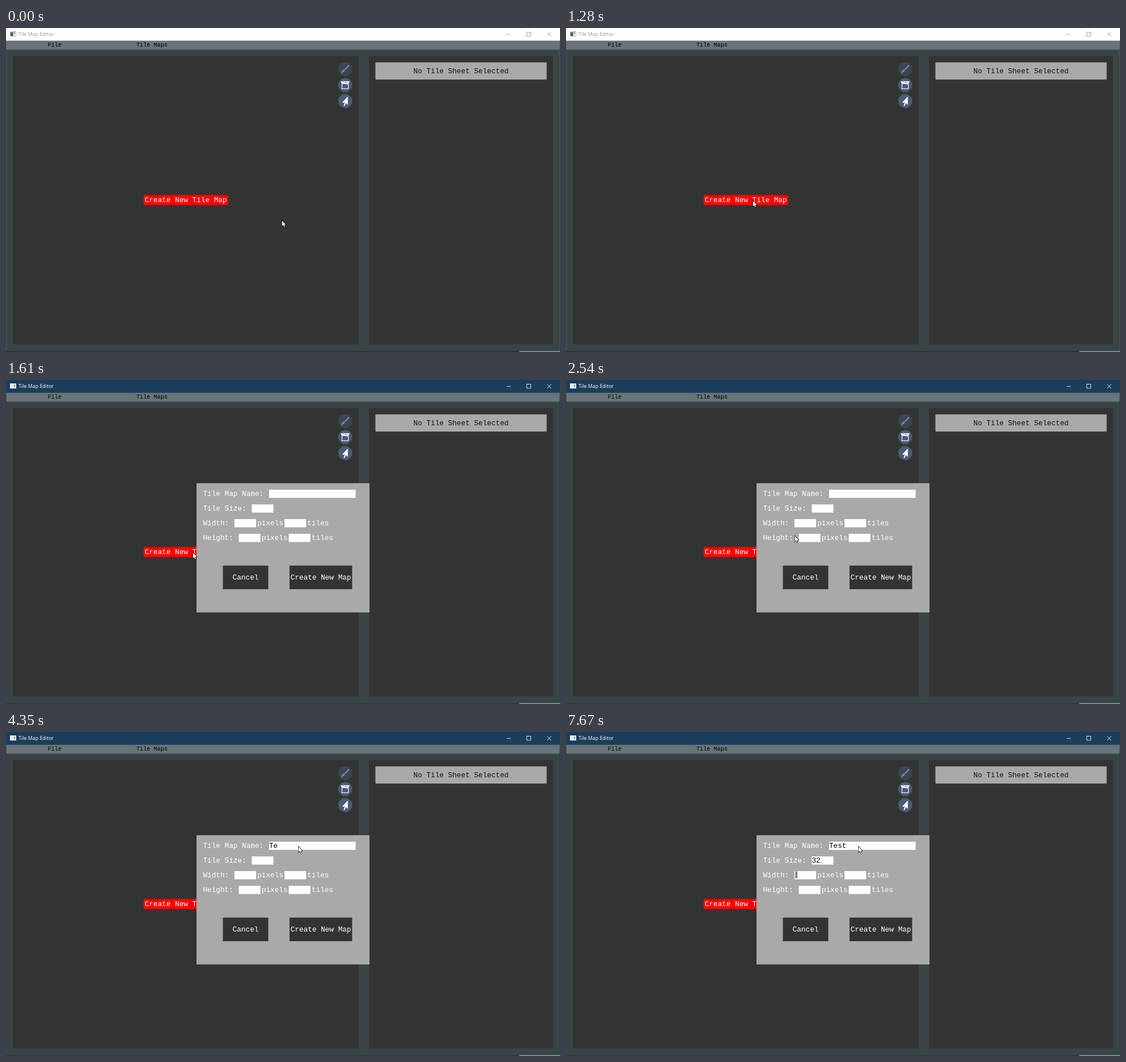
Animation, 977 px wide and 573 px high, one loop 8 s. Source, as an HTML page with a canvas:

```html
<!DOCTYPE html>
<html lang="en">
<head>
<meta charset="utf-8">
<title>Tile Map Editor</title>
<style>
html, body { margin: 0; width: 100%; height: 100%; overflow: hidden; background: #3b4445; }
canvas { display: block; }
</style>
</head>
<body>
<canvas id="stage" width="977" height="573"></canvas>
<script>
const W = 977, H = 573, LOOP = 8000;
const ctx = document.getElementById('stage').getContext('2d');

const CHAR = 7.63;
const MONO = '12.72px "Liberation Mono", monospace';
const MENU = '10.18px "Liberation Mono", monospace';
const TITLE = '8.9px "Open Sans", sans-serif';
const DARK = '#323433', GREY = '#a9a9a9', WHITE = '#ffffff';

const ACTIVATE = 1510, DIALOG = 1610, FOCUS = 3590;
const BLINK = 370, BLINK_ON = 5450;
const TICK = 47;

// Labels and inputs follow each other from left to right.
const ROWS = [
  ['Tile Map Name: ', { chars: 20, value: 'Test', start: 4120, pace: 172, focus: FOCUS, blur: 5240 }],
  ['Tile Size: ', { chars: 5, value: '32', start: 6570, pace: 130, focus: 5240, blur: 7160 }],
  ['Width: ', { chars: 5, value: '', focus: 7160, blur: LOOP }, 'pixels', { chars: 5 }, 'tiles'],
  ['Height: ', { chars: 5 }, 'pixels', { chars: 5 }, 'tiles']
];

const START = { x: 486.3, y: 340 };
const MOVES = [
  { from: 30, to: 80, x: 428.4, y: 281 },
  { from: 260, to: 540, x: 349.5, y: 301 },
  { from: 720, to: 870, x: 346.4, y: 302 },
  { from: 920, to: 950, x: 333.4, y: 305 },
  { from: 1100, to: 1280, x: 329.4, y: 305 },
  { from: 2210, to: 3000, x: 505.8, y: 194, sway: 33 },
  { from: 3330, to: 3430, x: 515.4, y: 202 }
];

function rect(x, y, w, h, color) {
  ctx.fillStyle = color;
  ctx.fillRect(x, y, w, h);
}

function text(str, x, y, color, font = MONO, align = 'left') {
  ctx.font = font;
  ctx.textAlign = align;
  ctx.fillStyle = color;
  ctx.fillText(str, x, y);
}

function disc(x, y, r, color) {
  ctx.fillStyle = color;
  ctx.beginPath();
  ctx.arc(x, y, r, 0, Math.PI * 2);
  ctx.fill();
}

function line(x1, y1, x2, y2, color, width) {
  ctx.strokeStyle = color;
  ctx.lineWidth = width;
  ctx.beginPath();
  ctx.moveTo(x1, y1);
  ctx.lineTo(x2, y2);
  ctx.stroke();
}

function button(cx, cy, w, h, fill, label, ink) {
  rect(cx - w / 2, cy - h / 2, w, h, fill);
  text(label, cx, cy + 3.8, ink, MONO, 'center');
}

function arrow(x, y, scaleX, scaleY, outline) {
  ctx.save();
  ctx.translate(x, y);
  ctx.scale(scaleX, scaleY);
  const shape = new Path2D('M.8 1V16.2L4.2 13L6.5 18.4L8.7 17.5L6.4 12.2H11.4Z');
  if (outline) {
    ctx.strokeStyle = outline;
    ctx.lineWidth = 1.9;
    ctx.stroke(shape);
  }
  ctx.fillStyle = WHITE;
  ctx.fill(shape);
  ctx.restore();
}

function pointerAt(t) {
  let { x, y } = START;
  for (const move of MOVES) {
    if (t < move.from) break;
    const steps = Math.round((move.to - move.from) / TICK);
    const gap = (move.to - move.from) / steps;
    const step = Math.min(steps, Math.floor((t - move.from) / gap + 1e-6));
    const p = (step + 1) / (steps + 1) || 1;
    const e = p * p * (3 - 2 * p);
    x += (move.x - x) * e;
    y += (move.y - y) * e + (move.sway || 0) * Math.sin(2 * Math.PI * e);
  }
  return { x, y };
}

function drawTitleBar(active) {
  const bar = active ? '#1b3e5a' : WHITE;
  rect(0, 0, W, 22.7, bar);
  rect(7, 6.2, 11, 8.8, active ? WHITE : '#a0a8ac');
  rect(7.8, 7.6, 9.4, 6.6, WHITE);
  rect(8, 7.6, 4.8, 6.4, active ? '#e6edf0' : '#46696a');
  rect(14.2, 8.2, 1.5, 3.2, active ? bar : '#7d8c91');
  text('Tile Map Editor', 22, 14, active ? WHITE : '#949494', TITLE);

  const ink = active ? WHITE : '#8e8e8e', thin = 0.8;
  line(883, 11.3, 890.3, 11.3, ink, thin);
  ctx.strokeRect(918.5, 7.5, 7, 7);
  line(954.2, 7.4, 961.6, 14.8, ink, thin);
  line(961.6, 7.4, 954.2, 14.8, ink, thin);
}

function drawTools() {
  const x = 598.2, blue = '#4a5b73', dim = '#7d8388';
  disc(x, 72.6, 12.4, '#3a4652');
  disc(x, 101, 12.4, blue);
  disc(x, 129.2, 12.4, blue);

  line(x - 1, 73.6, x + 7, 66, dim, 2.6);
  line(x - 6.4, 78.6, x - 1.4, 74.4, dim, 3.4);

  rect(x - 7, 94, 14, 3.4, WHITE);
  line(x - 5, 95.6, x + 5, 95.6, blue, 0.7);
  ctx.strokeStyle = WHITE;
  ctx.lineWidth = 1.2;
  ctx.strokeRect(x - 5.5, 96.5, 11, 11);
  line(x - 5, 98, x + 5, 99, WHITE, 1.6);

  arrow(x + 5.4, 120, -0.95, 0.98);
}

function drawWindow(active) {
  rect(0, 0, W, H, '#3b4445');
  drawTitleBar(active);
  rect(0, 22.7, W, 15.5, '#69747a');
  text('File', 73.6, 33.2, '#000000', MENU);
  text('Tile Maps', 230, 33.2, '#000000', MENU);

  rect(12, 49.5, 610, 510, DARK);
  rect(640, 49.5, 325, 510, DARK);
  button(802.5, 76, 302, 30.4, GREY, 'No Tile Sheet Selected', '#101010');
  drawTools();
  button(317.1, 304.4, 149, 18, '#ff0000', 'Create New Tile Map', WHITE);

  const edge = active ? '#1f4460' : '#4c575c';
  rect(0, 22.7, 0.8, H, edge);
  rect(W - 0.7, 22.7, 0.7, H, edge);
  rect(0, 571.5, W, 1.5, active ? '#213a4b' : '#273036');
  rect(905.5, 571.5, W, 1.5, '#93a0a7');
}

function drawInput(t, field, x, y) {
  const { chars, value = '', start, pace, focus, blur } = field;
  const typed = value && t >= start
    ? Math.min(value.length, Math.floor((t - start) / pace) + 1) : 0;
  rect(x, y, chars * CHAR, 14.5, WHITE);
  text(value.slice(0, typed), x, y + 11, '#000000');

  const lit = Math.floor((t - BLINK_ON) / BLINK) % 2 === 0;
  if (lit && t >= focus && t < blur) {
    rect(x + 1.4 + typed * CHAR, y + 0.6, 3.8, 11.9, '#808080');
  }
}

function drawDialog(t) {
  const gap = 2.1;
  rect(336, 182.5, 305, 228.6, GREY);
  ROWS.forEach((row, i) => {
    let x = 347.4;
    const y = 194 + i * 26;
    for (const item of row) {
      if (typeof item === 'string') {
        text(item, x, y + 11, WHITE);
        x += item.length * CHAR + gap;
      } else {
        drawInput(t, item, x, y);
        x += item.chars * CHAR + gap;
      }
    }
  });
  button(422.5, 349.1, 80, 41.8, DARK, 'Cancel', WHITE);
  button(555.2, 349.1, 110.4, 41.8, DARK, 'Create New Map', WHITE);
}

function draw(t) {
  drawWindow(t >= ACTIVATE);
  if (t >= DIALOG) drawDialog(t);
  const { x, y } = pointerAt(t);
  arrow(x, y, 0.636, 0.636, '#000000');

  const pressed = [DIALOG, FOCUS].some(release => t >= release - 100 && t < release);
  if (pressed) disc(x + 0.4, y - 0.2, 9.5, 'rgba(255, 255, 0, 0.5)');
}

const begin = performance.now();
function tick() {
  draw(Math.max(0, performance.now() - begin) % LOOP);
  requestAnimationFrame(tick);
}
tick();
</script>
</body>
</html>
```
